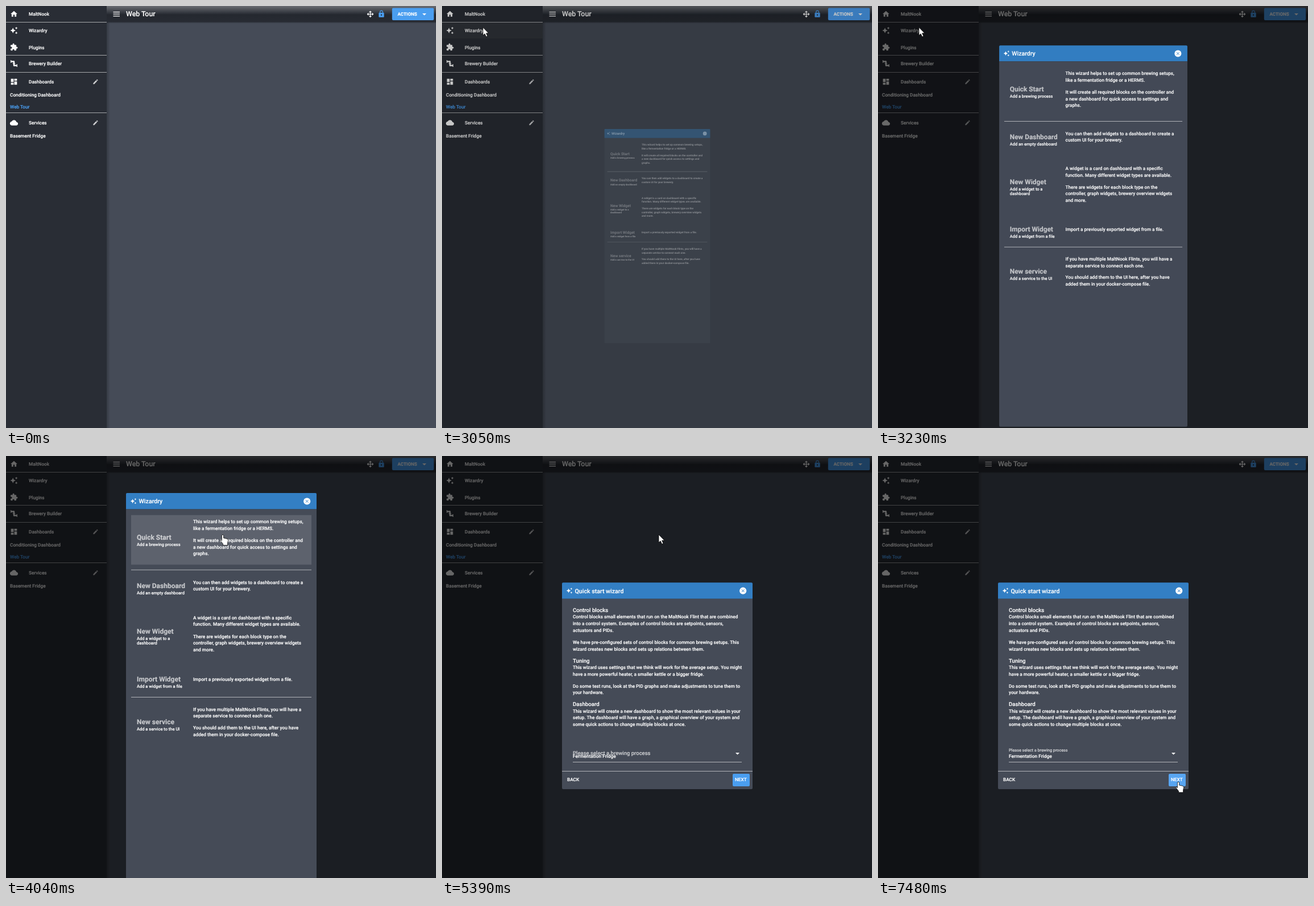
These frames come from a looping animation (756 px wide and 741 px high, 7560 ms). An HTML page with a canvas:

```html
<!DOCTYPE html>
<html lang="en">
<head>
<meta charset="utf-8">
<title>Brewing wizard</title>
<style>
html, body { margin: 0; width: 100%; height: 100%; overflow: hidden; background: #454b57; }
canvas { display: block; }
</style>
</head>
<body>
<canvas id="stage" width="756" height="741"></canvas>
<script>
const ctx = document.getElementById('stage').getContext('2d');
const W = 756, H = 741, LOOP = 7560;
const BLUE = '#4a9ef0', HEAD = '#337fc4', BODY = '#454b57', SIDE = '#292d35';
const RULE = 'rgba(255,255,255,.58)', MUTED = 'rgba(255,255,255,.68)';

const ICONS = {
  home: 'M10 20v-6h4v6h5v-8h3L12 3 2 12h3v8z',
  magic: 'M19 1L17.74 3.75 15 5l2.74 1.26L19 9l1.25-2.74L23 5l-2.75-1.25zM9 4L6.5 9.5 1 12l5.5 2.5L9 20l2.5-5.5L17 12l-5.5-2.5zM19 15l-1.26 2.74L15 19l2.74 1.25L19 23l1.25-2.75L23 19l-2.75-1.26z',
  plugin: 'M20.5 11H19V7c0-1.1-.9-2-2-2h-4V3.5C13 2.12 11.88 1 10.5 1S8 2.12 8 3.5V5H4c-1.1 0-2 .9-2 2v3.8h1.5c1.49 0 2.7 1.21 2.7 2.7s-1.21 2.7-2.7 2.7H2V20c0 1.1.9 2 2 2h3.8v-1.5c0-1.49 1.21-2.7 2.7-2.7s2.7 1.21 2.7 2.7V22H17c1.1 0 2-.9 2-2v-4h1.5a2.5 2.5 0 0 0 0-5z',
  pipe: 'M22 14h-2v2h-6v-3h2v-2h-2V6a2 2 0 0 0-2-2H4V2H2v8h2V8h6v3H8v2h2v5a2 2 0 0 0 2 2h8v2h2z',
  board: 'M3 13h8V3H3zm0 8h8v-6H3zm10 0h8V11h-8zm0-18v6h8V3z',
  cloud: 'M19.35 10.04C18.67 6.59 15.64 4 12 4 9.11 4 6.6 5.64 5.35 8.04 2.34 8.36 0 10.91 0 14c0 3.31 2.69 6 6 6h13c2.76 0 5-2.24 5-5 0-2.64-2.05-4.78-4.65-4.96z',
  edit: 'M3 17.25V21h3.75L17.81 9.94l-3.75-3.75zM20.71 7.04c.39-.39.39-1.02 0-1.41l-2.34-2.34c-.39-.39-1.02-.39-1.41 0l-1.83 1.83 3.75 3.75z',
  lock: 'M18 8h-1V6A5 5 0 0 0 7 6v2H6c-1.1 0-2 .9-2 2v10c0 1.1.9 2 2 2h12c1.1 0 2-.9 2-2V10c0-1.1-.9-2-2-2zm-6 9a2 2 0 1 1 0-4 2 2 0 0 1 0 4zm3.1-9H8.9V6a3.1 3.1 0 0 1 6.2 0z',
  move: 'M13 11h5l-1.5-1.5 1.42-1.42L21.84 12l-3.92 3.92-1.42-1.42L18 13h-5v5l1.5-1.5 1.42 1.42L12 21.84l-3.92-3.92L9.5 16.5 11 18v-5H6l1.5 1.5-1.42 1.42L2.16 12l3.92-3.92L7.5 9.5 6 11h5V6L9.5 7.5 8.08 6.08 12 2.16l3.92 3.92L14.5 7.5 13 6z'
};
for (const k in ICONS) ICONS[k] = new Path2D(ICONS[k]);
const ARROW = new Path2D('M0 0V14L3.2 11.2 5.7 16.6 8 15.6 5.7 10.3H10Z');
const HAND = new Path2D('M-1.6 1.2Q0-.8 1.6 1.2V6L8 7.4Q9.8 8 9.6 10.5L8.6 14.5V18.8H.6V16.5L-4.4 10.2Q-4 8-1.6 10.5Z');

const clamp = x => Math.max(0, Math.min(1, x));
const ramp = (t, a, b) => clamp((t - a) / (b - a));
const smooth = x => x * x * (3 - 2 * x);
const mix = (a, b, p) => a + (b - a) * p;

function rect(x, y, w, h, color, r = 0) {
  ctx.fillStyle = color;
  ctx.beginPath();
  ctx.roundRect(x, y, w, h, r);
  ctx.fill();
}

// y is the middle of the capitals; a hairline stroke thickens small type
function text(s, x, y, size = 8.26, color = '#fff', weight = 500) {
  ctx.font = `${weight} ${size}px Roboto, sans-serif`;
  ctx.fillStyle = ctx.strokeStyle = color;
  ctx.lineWidth = .18;
  ctx.fillText(s, x, y + size * .356);
  ctx.strokeText(s, x, y + size * .356);
}

function lines(rows, x, y, size, step = 11.7) {
  rows.forEach((s, i) => text(s, x, y + i * step, size));
}

function icon(name, x, y, size = 14.2, color = '#fff') {
  ctx.save();
  ctx.translate(x - size / 2, y - size / 2);
  ctx.scale(size / 24, size / 24);
  ctx.fillStyle = color;
  ctx.fill(ICONS[name]);
  ctx.restore();
}

function caret(x, y) {
  ctx.fillStyle = '#fff';
  ctx.beginPath();
  ctx.moveTo(x - 3.5, y - 1.5);
  ctx.lineTo(x + 3.5, y - 1.5);
  ctx.lineTo(x, y + 2);
  ctx.fill();
}

function fade(x0, y0, x1, y1, stops) {
  const g = ctx.createLinearGradient(x0, y0, x1, y1);
  stops.forEach(([p, c]) => g.addColorStop(p, c));
  return g;
}

function page(hover) {
  rect(0, 0, W, H, BODY);
  const shade = [[0, 'rgba(0,0,0,.22)'], [1, 'rgba(0,0,0,0)']];
  rect(177, 28, 6, H - 28, fade(177, 0, 183, 0, shade));
  rect(177, 28, W - 177, 3, fade(0, 28, 0, 31, shade));

  rect(177, 0, W - 177, 28.5, SIDE);
  rect(177, 0, W - 177, 28.5, fade(0, 0, 0, 28.5, [
    [0, 'rgba(255,255,255,.3)'], [.5, 'rgba(255,255,255,0)'],
    [.51, 'rgba(0,0,0,.12)'], [1, 'rgba(0,0,0,.04)']]));
  for (const y of [10, 13.5, 17]) rect(188.5, y, 11.5, 1.3, '#fff');
  text('Web Tour', 211, 14, 12.4);
  icon('move', 640.5, 14.3, 14.4);
  icon('lock', 660, 14, 14, BLUE);
  rect(678.8, 3.5, 73.4, 21.5, BLUE, 2);
  text('ACTIONS', 688.5, 14.3, 8.1, '#fff', 700);
  caret(735.5, 14.5);

  rect(0, 0, 177, H, SIDE);
  if (hover > 0) rect(0, 29, 177, 28, `rgba(255,255,255,${hover})`);
  for (const y of [28, 86, 116, 187]) rect(0, y, 177, 1, RULE);
  const menu = [['home', 'MaltNook', 14], ['magic', 'Wizardry', 43], ['plugin', 'Plugins', 72.3],
    ['pipe', 'Brewery Builder', 101], ['board', 'Dashboards', 133], ['cloud', 'Services', 205]];
  for (const [name, label, y] of menu) {
    icon(name, 14, y);
    text(label, 40, y + .3);
  }
  icon('edit', 157.5, 133, 11, '#d0d1d3');
  icon('edit', 157.5, 205, 11, '#d0d1d3');
  text('Conditioning Dashboard', 7, 156);
  text('Web Tour', 7, 177.4, 8.26, BLUE);
  text('Basement Fridge', 7, 228);
}

function panel(title, y, bottom) {
  rect(211, y, 335, 28.5, HEAD, [2, 2, 0, 0]);
  rect(211, y + 28.5, 335, bottom - y - 28.5, BODY, [0, 0, 2, 2]);
  icon('magic', 224, y + 14.3, 11.5);
  text(title, 233.5, y + 14.6, 10.62);
  ctx.fillStyle = '#fff';
  ctx.beginPath();
  ctx.arc(529.2, y + 14.5, 6.1, 0, 7);
  ctx.fill();
  ctx.strokeStyle = HEAD;
  ctx.lineWidth = 1;
  ctx.beginPath();
  for (const d of [-2.3, 2.3]) {
    ctx.moveTo(529.2 - d, y + 12.2);
    ctx.lineTo(529.2 + d, y + 16.8);
  }
  ctx.stroke();
}

const CHOICES = [
  ['Quick Start', 143, ['Add a brewing process']],
  ['New Dashboard', 227.5, ['Add an empty dashboard']],
  ['New Widget', 308, ['Add a widget to a', 'dashboard']],
  ['Import Widget', 392, ['Add a widget from a file']],
  ['New service', 466.3, ['Add a service to the UI']]
];
const HELP = [
  [115, 'This wizard helps to set up common brewing setups,', 'like a fermentation fridge or a HERMS.'],
  [148, 'It will create all required blocks on the controller and', 'a new dashboard for quick access to settings and', 'graphs.'],
  [221.6, 'You can then add widgets to a dashboard to create a', 'custom UI for your brewery.'],
  [283.7, 'A widget is a card on dashboard with a specific', 'function. Many different widget types are available.'],
  [316.6, 'There are widgets for each block type on the', 'controller, graph widgets, brewery overview widgets', 'and more.'],
  [392, 'Import a previously exported widget from a file.'],
  [444.7, 'If you have multiple MaltNook Flints, you will have a', 'separate service to connect each one.'],
  [477.4, 'You should add them to the UI here, after you have', 'added them in your docker-compose file.']
];
const GUIDE = [
  [282.5, 'Control blocks small elements that run on the MaltNook Flint that are combined', 'into a control system. Examples of control blocks are setpoints, sensors,', 'actuators and PIDs.'],
  [327.4, 'We have pre-configured sets of control blocks for common brewing setups. This', 'wizard creates new blocks and sets up relations between them.'],
  [371.3, 'This wizard uses settings that we think will work for the average setup. You might', 'have a more powerful heater, a smaller kettle or a bigger fridge.'],
  [403.7, 'Do some test runs, look at the PID graphs and make adjustments to tune them to', 'your hardware.'],
  [447.6, 'This wizard will create a new dashboard to show the most relevant values in your', 'setup. The dashboard will have a graph, a graphical overview of your system and', 'some quick actions to change multiple blocks at once.']
];

function chooser(p, hover) {
  const s = .3 + .7 * p;
  ctx.save();
  ctx.globalAlpha = p;
  ctx.translate(378.5, 404);
  ctx.scale(s, s);
  ctx.translate(-378.5, -404);
  panel('Wizardry', 65, 743);
  if (hover > 0) rect(220, 103.7, 317, 87, `rgba(255,255,255,${hover})`);
  rect(220, 199.6, 317, 1, RULE);
  rect(220, 423, 317, 1, RULE);
  for (const [name, y, sub] of CHOICES) {
    text(name, 230, y, 12, MUTED, 700);
    lines(sub, 230, y + 12.8, 7.5, 8);
  }
  for (const [y, ...rows] of HELP) lines(rows, 329, y, 8.26);
  ctx.restore();
}

function quickStart(label, hover) {
  panel('Quick start wizard', 222.2, 585);
  text('Control blocks', 230, 270.3, 9.65);
  text('Tuning', 230, 359.2, 9.65);
  text('Dashboard', 230, 435.6, 9.65);
  for (const [y, ...rows] of GUIDE) lines(rows, 230, y, 8.18);
  text('Please select a brewing process', 230, mix(521.5, 516, label), mix(9.5, 7.2, label), MUTED);
  text('Fermentation Fridge', 230, 526.6, 8.4);
  rect(230, 537, 297, 1, RULE);
  caret(519.5, 522.5);
  rect(211, 553, 335, 1, RULE);
  text('BACK', 220, 568.5);
  rect(511, 558, 30, 22, BLUE, 2);
  if (hover > 0) rect(511, 558, 30, 22, `rgba(255,255,255,${hover})`, 2);
  text('NEXT', 515, 568.5);
}

// time, x, y of the pointer tip
const PATH = [
  [620, 416, 642], [1240, 87, 20], [1470, 87, 20], [1650, 72, 37.5],
  [3450, 72, 37.5], [3680, 381, 89], [3830, 381, 89], [3940, 376.5, 114], [4040, 381, 138],
  [5420, 381, 138], [5720, 724, 222], [6080, 724, 222], [6820, 494.5, 636],
  [6920, 494.5, 636], [7270, 532, 548], [7480, 528, 572]
];
const HOLDS = [[1530, 3010], [3890, 5330], [7220, LOOP]];

function pointer(t) {
  if (t < PATH[0][0]) return;
  let i = PATH.findIndex(k => k[0] > t);
  if (i < 0) i = PATH.length;
  const a = PATH[i - 1], b = PATH[i] || a;
  const p = a === b ? 1 : smooth(ramp(t, a[0], b[0]));
  const shape = HOLDS.some(([s, e]) => t >= s && t < e) ? HAND : ARROW;
  ctx.save();
  ctx.translate(mix(a[1], b[1], p), mix(a[2], b[2], p));
  ctx.strokeStyle = 'rgba(0,0,0,.75)';
  ctx.lineWidth = 1;
  ctx.fillStyle = '#fff';
  ctx.fill(shape);
  ctx.stroke(shape);
  ctx.restore();
}

function draw(t) {
  const open = 1 - Math.pow(1 - ramp(t, 3009, 3309), 3);
  page(.1 * ramp(t, 1480, 1650) * (1 - ramp(t, 2900, 3120)));
  if (open > 0) {
    rect(0, 0, W, H, `rgba(0,0,0,${.6 * open})`);
    if (t < 5330) chooser(open, .13 * ramp(t, 3880, 4040) + .05 * ramp(t, 5250, 5330));
    else quickStart(smooth(ramp(t, 5390, 5710)), .08 * ramp(t, 7220, 7460));
  }
  pointer(t);
}

function tick() {
  draw(performance.now() % LOOP);
  requestAnimationFrame(tick);
}
ctx.textRendering = 'geometricPrecision';
tick();
</script>
</body>
</html>
```
